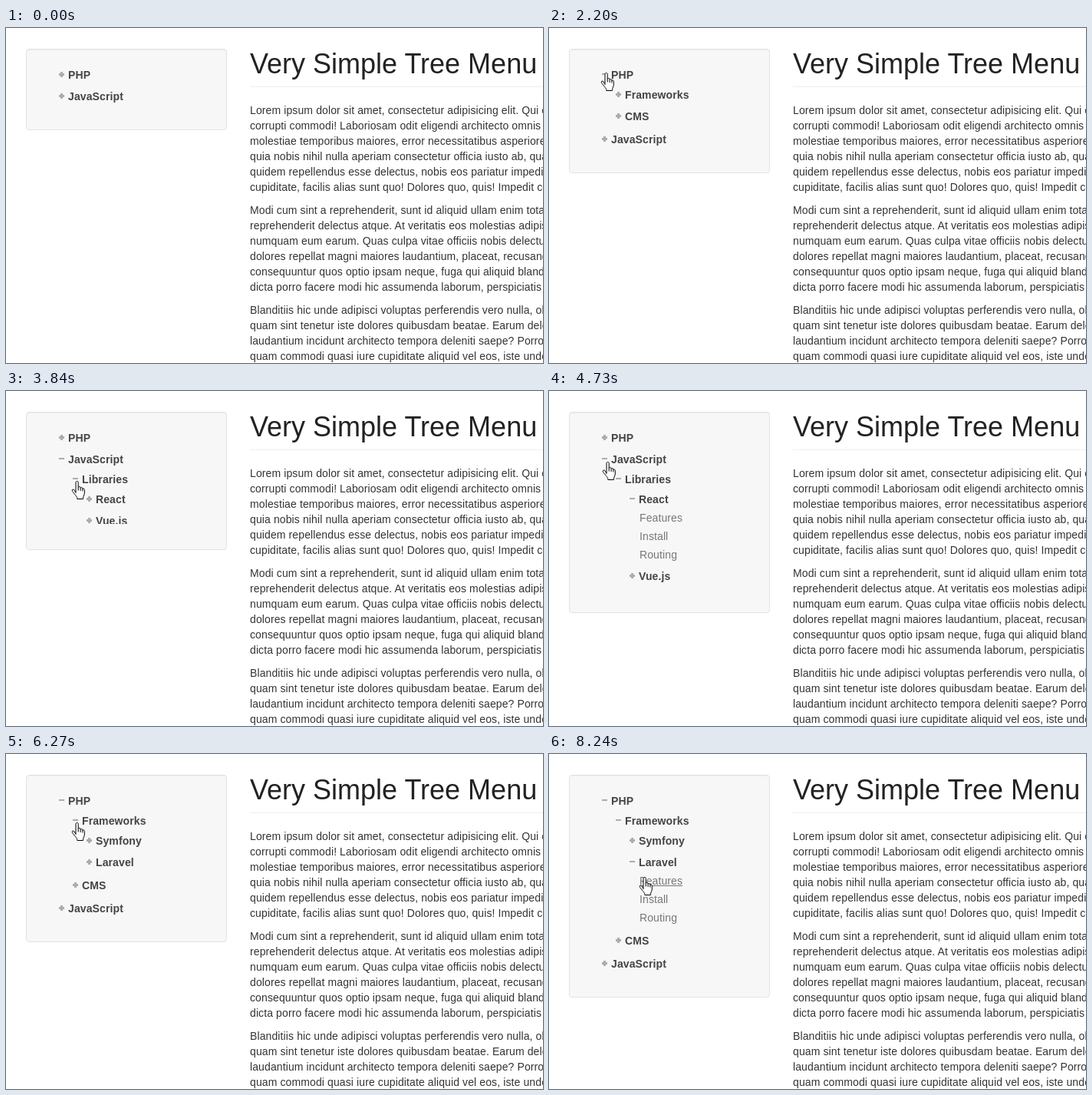
An HTML page for the animation above (8.34 s loop, 700x436 px).

```html
<!DOCTYPE html>
<html lang="en">
<head>
<meta charset="utf-8">
<title>Very Simple Tree Menu</title>
<style>
  html, body { margin: 0; width: 100%; height: 100%; overflow: hidden; background: #fff; }
  body { position: relative; font: 14px/20px "Liberation Sans", Arial, sans-serif; letter-spacing: .11px; color: #333; }
  #panel {
    position: absolute; left: 26px; top: 27px; width: 262px; box-sizing: border-box;
    padding: 19px 19px 29px; background: #f7f7f7; border: 1px solid #e3e3e3; border-radius: 4px;
    box-shadow: inset 0 1px 1px rgba(0, 0, 0, .05);
  }
  ul { list-style: none; margin: 0; padding: 0 0 0 18px; overflow: hidden; }
  #panel > ul { padding-left: 22px; }
  .branch { padding: 2px 0; }
  .row { position: relative; width: fit-content; height: 24px; line-height: 24px; white-space: nowrap; }
  .branch > .row { padding-left: 13px; font-weight: bold; color: #444; }
  .leaf > .row { margin-left: -4px; color: #777; }
  .leaf > .row.hover { text-decoration: underline; }
  .icon {
    position: absolute; left: 1px; top: 8px; width: 7px; height: 7px;
    --bar: linear-gradient(#acacac, #acacac);
    background: var(--bar) center / 7px 3px no-repeat, var(--bar) center / 3px 7px no-repeat;
  }
  .open > .row .icon { background: var(--bar) 0 2px / 7px 2px no-repeat; }
  main { position: absolute; left: 318px; top: 27px; width: 800px; white-space: pre; }
  h1 { margin: 0 0 20px; padding-bottom: 9px; border-bottom: 1px solid #eee; letter-spacing: normal;
       font-size: 36px; font-weight: normal; line-height: 1.1; color: #222; }
  p { margin: 0 0 10px; }
  #cursor { position: absolute; left: 0; top: 0; width: 1px; height: 1px; overflow: visible; pointer-events: none; }
  #cursor path { fill: #fff; stroke: #000; stroke-linejoin: round; }
  #cursor .line { fill: none; }
</style>
</head>
<body>
<div id="panel"></div>
<main><h1>Very Simple Tree Menu</h1><p>Lorem ipsum dolor sit amet, consectetur adipisicing elit. Qui odit
corrupti commodi! Laboriosam odit eligendi architecto omnis
molestiae temporibus maiores, error necessitatibus asperiores
quia nobis nihil nulla aperiam consectetur officia iusto ab, quae
quidem repellendus esse delectus, nobis eos pariatur impedit
cupiditate, facilis alias sunt quo! Dolores quo, quis! Impedit corrupti</p><p>Modi cum sint a reprehenderit, sunt id aliquid ullam enim totam
reprehenderit delectus atque. At veritatis eos molestias adipisci
numquam eum earum. Quas culpa vitae officiis nobis delectus
dolores repellat magni maiores laudantium, placeat, recusandae
consequuntur quos optio ipsam neque, fuga qui aliquid blanditiis
dicta porro facere modi hic assumenda laborum, perspiciatis</p><p>Blanditiis hic unde adipisci voluptas perferendis vero nulla, obcaecati
quam sint tenetur iste dolores quibusdam beatae. Earum deleniti
laudantium incidunt architecto tempora deleniti saepe? Porro
quam commodi quasi iure cupiditate aliquid vel eos, iste unde</p></main>
<svg id="cursor">
  <g id="arrow"><path d="M.5.5V16.5L4.2 13.1 6.6 18.8 9.2 17.7 6.8 12.1H11.8Z"/></g>
  <g id="hand" transform="translate(-6.5 0)">
    <path d="M5.5 15.5V2.2c0-2.3 3.2-2.3 3.2 0V8.5c.3-1.6 2.9-1.4 2.9.4v.6c.4-1.4 2.8-1.2 2.8.5v.7c.5-1.2 2.4-.9 2.4.8v4.5c0 2.5-1.8 3.5-1.8 6.7v.8H7.3v-1c0-2-4.2-6-6.2-9-1.2-2 .8-3.2 2.2-1.9z"/>
    <path class="line" d="M8.7 8.5v4M11.6 9.5v3.5M14.4 10.5v3"/>
  </g>
  <g id="beam"><path class="line" d="M-3 -7.5h2.5l.5.5.5-.5H3M0 -7V8M-3 8.5h2.5l.5-.5.5.5H3"/></g>
</svg>
<script>
const LOOP = 8340, SLIDE = 360;
const leaf = name => ({ name });
const branch = (name, slides = [], children = []) => ({ name, slides, children });
const pages = () => ['Features', 'Install', 'Routing'].map(leaf);

// Each slide is [click time, start of the movement, opens?].
const tree = [
  branch('PHP', [[1780, 1790, true], [2690, 2767, false], [5030, 5235, true]], [
    branch('Frameworks', [[5880, 5890, true]], [
      branch('Symfony'),
      branch('Laravel', [[6760, 7000, true]], pages()),
    ]),
    branch('CMS'),
  ]),
  branch('JavaScript', [[2690, 2767, true], [5030, 5235, false]], [
    branch('Libraries', [[3500, 3580, true]], [
      branch('React', [[4363, 4363, true]], pages()),
      branch('Vue.js'),
    ]),
  ]),
];

// Pointer stops: time, x, y.
const stops = [
  [930, 593, 388], [1110, 1, 115], [1140, -30, 100],
  [1300, 4, 52], [1420, 74, 57], [2170, 74, 57], [2590, 74, 150], [2690, 74, 150],
  [2900, 74, 162], [3080, 74, 162], [3480, 92, 117], [4130, 92, 117],
  [4370, 110, 146], [4430, 110, 146], [4730, 76, 92], [5000, 74, 65], [5300, 74, 65],
  [5680, 92, 89], [6250, 92, 89], [6690, 110, 142], [7000, 110, 142],
  [7110, 110, 150], [7350, 119, 160], [8030, 119, 160], [8240, 124, 160],
];

const $ = id => document.getElementById(id);
const swing = k => 0.5 - Math.cos(Math.PI * Math.min(1, Math.max(0, k))) / 2;

function add(parent, tag, className = '') {
  const el = parent.appendChild(document.createElement(tag));
  el.className = className;
  return el;
}

function build(nodes, parent) {
  const list = add(parent, 'ul');
  for (const node of nodes) {
    node.item = add(list, 'li', node.children ? 'branch' : 'leaf');
    const row = add(node.item, 'div', 'row');
    if (node.children) add(row, 'span', 'icon');
    row.append(node.name);
    if (node.children) node.list = build(node.children, node.item);
  }
  return list;
}

// Sets the state of a node and returns its height.
function layout(node, t) {
  if (!node.children) return 24;
  const full = node.children.reduce((sum, child) => sum + layout(child, t), 0);
  const slide = node.slides.findLast(([click]) => click <= t);
  let height = 0;
  if (slide) {
    const [, start, opens] = slide;
    const k = swing((t - start) / SLIDE);
    height = opens ? Math.max(1, Math.round(full * k)) : Math.round(full * (1 - k));
  }
  node.item.classList.toggle('open', Boolean(slide && slide[2]));
  node.list.style.height = height + 'px';
  return 28 + height;
}

function pointerAt(t) {
  if (t < stops[0][0] || (t >= 1140 && t < 1300)) return null;
  const i = stops.findLastIndex(([time]) => time <= t);
  const [t0, x0, y0] = stops[i];
  const [t1, x1, y1] = stops[i + 1] || [LOOP, x0, y0];
  const linear = (t - t0) / (t1 - t0);
  const k = t < 1140 ? linear : swing(linear);
  return [x0 + (x1 - x0) * k, y0 + (y1 - y0) * k].map(Math.round);
}

function drawPointer(t) {
  const at = pointerAt(t);
  $('cursor').style.display = at ? '' : 'none';
  const under = at && document.elementFromPoint(...at);
  const row = under && under.closest('.row');
  const shape = row ? 'hand' : under && under.closest('p, h1') ? 'beam' : 'arrow';
  for (const id of ['arrow', 'hand', 'beam']) $(id).style.display = id === shape ? '' : 'none';
  for (const el of document.querySelectorAll('.leaf > .row')) el.classList.toggle('hover', el === row);
  if (at) $('cursor').style.transform = `translate(${at[0]}px, ${at[1]}px)`;
}

function frame(now) {
  const t = now % LOOP;
  tree.forEach(node => layout(node, t));
  drawPointer(t);
  requestAnimationFrame(frame);
}

build(tree, $('panel'));
requestAnimationFrame(frame);
</script>
</body>
</html>
```
